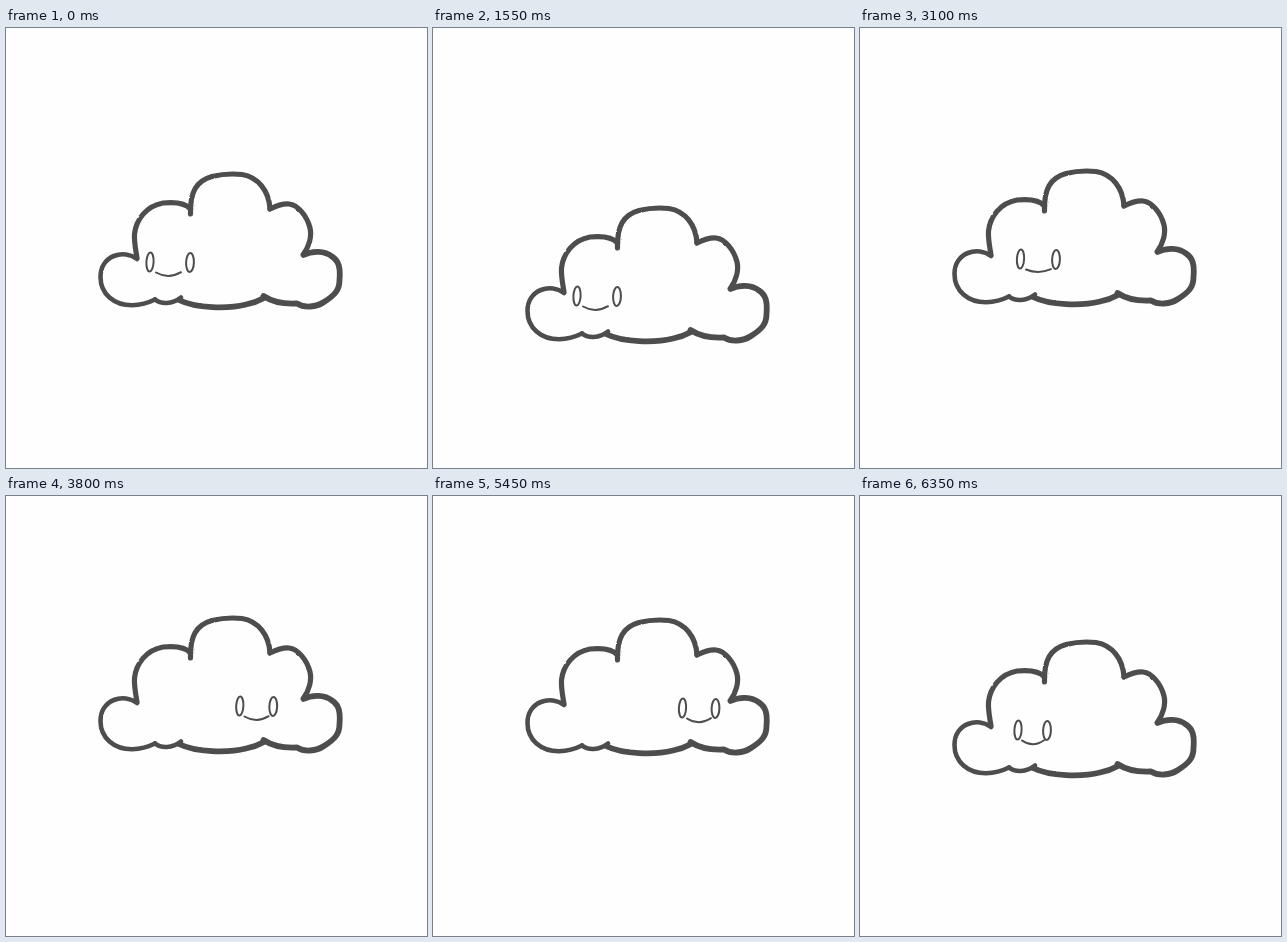
Recreate the animation shown at these times as an HTML page. Size 421 by 440 pixels, loop 6.4 s.

```html
<!DOCTYPE html>
<html lang="en">
<head>
<meta charset="utf-8">
<title>Drifting cloud</title>
<style>
  html, body { margin: 0; width: 100%; height: 100%; overflow: hidden; background: #fefefe; }
  svg { display: block; width: 421px; height: 440px; }
  path, ellipse { fill: none; stroke: #4d4d4d; stroke-linecap: round; stroke-linejoin: round; }
  .outline { stroke-width: 5.2; }
  .outline .thin { stroke-width: 4.6; }
  .outline .thick { stroke-width: 5.8; }
  .face { stroke-width: 2; }
</style>
</head>
<body>
<svg viewBox="0 0 421 440">
  <defs>
    <filter id="rough" filterUnits="userSpaceOnUse" x="80" y="130" width="270" height="165" color-interpolation-filters="sRGB">
      <feTurbulence type="fractalNoise" baseFrequency="0.16" numOctaves="2" seed="4"/>
      <feDisplacementMap in="SourceGraphic" scale="1.7" xChannelSelector="R" yChannelSelector="G"/>
    </filter>
  </defs>
  <g id="cloud">
    <g class="outline" filter="url(#rough)">
      <path class="thin" d="M131 231C118 221 94.500 227 94.500 249C94.500 266 108 277.300 126 277.300C135 277 142 275 149 271.500"/>
      <path class="thin" d="M149 271.500C155 276.500 166 276.500 175 269.500"/>
      <path class="thick" d="M173 272C190 280.500 222 281 240 276.500Q250 274.500 258 270"/>
      <path class="thick" d="M257.500 268C268 275 282 276 291 275.500C298 280 310 279.500 318 274C329 267 333.500 262 333.500 252C334.500 240 333 233 326 228.500C319 222.500 306 222.500 297.500 227"/>
      <path d="M297.500 226C303 219 306 208 304 200C301 188 292 177 283 176C276 175.500 270 178 264 181"/>
      <path d="M264 181C263 163 252 149 236 146.500C226 145.500 214 146.500 206 148.500C190 153 184 164 184.500 186"/>
      <path d="M184.500 181C179 174.500 167 174 157 175C140 178 130 192 128.500 206C128 215 130 223 131 230"/>
    </g>
    <g class="face">
      <ellipse id="left" rx="3.6" ry="9.6"/>
      <ellipse id="right" rx="3.9" ry="9.4"/>
      <path id="smile"/>
    </g>
  </g>
</svg>
<script>
  const STEP = 50, COUNT = 128;
  const $ = id => document.getElementById(id);
  const cloud = $('cloud'), left = $('left'), right = $('right'), smile = $('smile');

  // Keys: step, then values; linear in between.
  const bob = [[0, 0], [30, 35], [60, 0], [90, -45], [127, 0]];
  // Left eye x, right eye x, smile x, smile half width, smile depth.
  const atLeft = [144, 184, 162.5, 12.5, 7];
  const leaving = [160.5, 196, 178.5, 12.5, 5];
  const atRight = [249.5, 282.5, 266, 12, 7.5];
  const returning = [158, 187, 173, 11, 7.5];
  const look = [
    [0, ...atLeft], [59, ...atLeft], [62, ...leaving], [79, ...atRight],
    [110, ...atRight], [127, ...returning]
  ];

  function sample(keys, step) {
    const i = Math.max(1, keys.findIndex(k => k[0] >= step));
    const a = keys[i - 1], b = keys[i];
    const p = (step - a[0]) / (b[0] - a[0]);
    return a.slice(1).map((v, n) => v + (b[n + 1] - v) * p);
  }

  function draw(now) {
    const step = Math.floor(now / STEP) % COUNT;
    const y = Math.ceil(sample(bob, step)[0] - 0.5);
    const [lx, rx, sx, half, depth] = sample(look, step);
    cloud.setAttribute('transform', `translate(0 ${y})`);
    left.setAttribute('transform', `translate(${lx} 234) rotate(3)`);
    right.setAttribute('transform', `translate(${rx} 234.5) rotate(2)`);
    smile.setAttribute('d', `M${sx - half} 244.5q${half} ${depth} ${2 * half} -0.3`);
  }

  const start = performance.now();
  function tick() {
    draw(performance.now() - start);
    requestAnimationFrame(tick);
  }
  tick();
</script>
</body>
</html>
```
